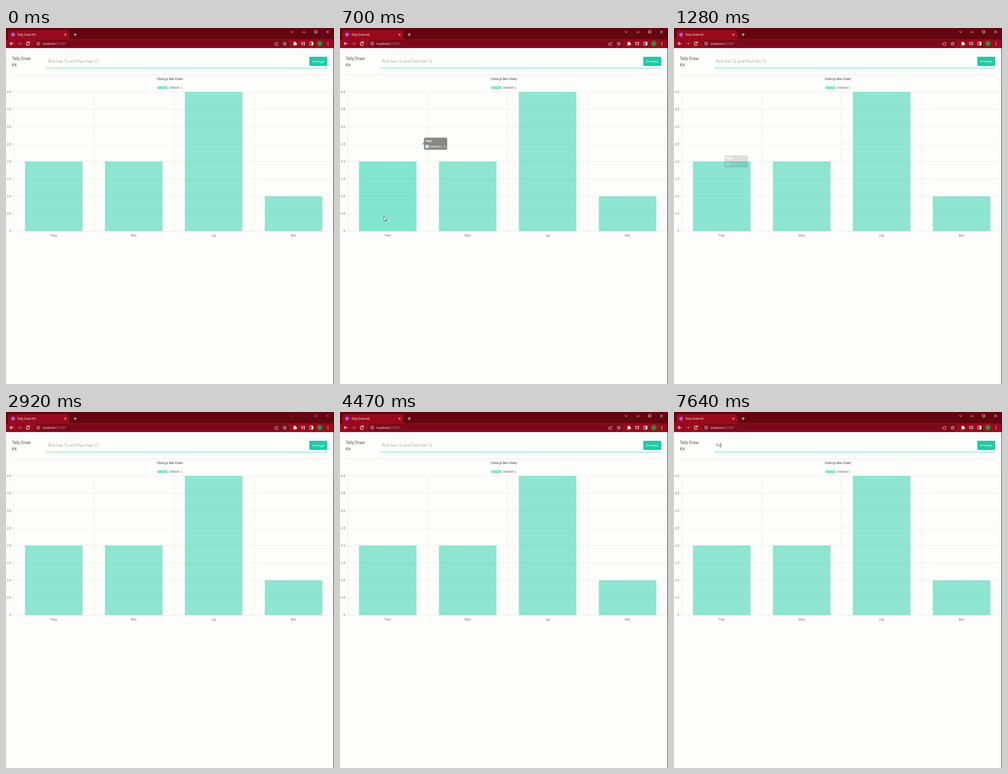
Write an HTML page that moves like this. It is 718 px wide and 780 px high and loops after 8000 ms.

```html
<!DOCTYPE html>
<html lang="en">
<head>
<meta charset="utf-8">
<title>Tally Draw Kit</title>
<style>
  html, body { margin: 0; width: 100%; height: 100%; overflow: hidden; background: #fdfdfb; }
  svg { display: block; width: 718px; height: 780px; }
  text { font-family: "Open Sans", sans-serif; font-size: 8.6px; fill: #333; }
  .chart text { font-family: "Liberation Sans", Arial, sans-serif; font-size: 6.65px; fill: #666; }
  .chart .bold { font-weight: bold; }
  .chart .tip { fill: #fff; }
  .small { font-size: 6.4px; fill: #fff; }
  .icon { fill: none; stroke: #fff; stroke-width: 1; }
  .solid { fill: #fff; }
</style>
</head>
<body>
<svg viewBox="0 0 718 780">
  <rect width="718" height="780" fill="#fdfdfb"/>

  <!-- Browser frame -->
  <rect width="718" height="26" fill="#640511"/>
  <path d="M2 25Q5 25 5 22V9Q5 5 9 5H135Q139 5 139 9V22Q139 25 142 25Z" fill="#990a1c"/>
  <rect y="24.5" width="718" height="19.5" fill="#990a1c"/>
  <rect x="62" y="26" width="558" height="16.5" rx="8.2" fill="#7c0919"/>
  <circle cx="15.5" cy="14.5" r="4.2" fill="#a05cf0"/>
  <text class="small" x="25" y="17">Tally Draw Kit</text>
  <text class="small" style="font-size:6.8px" x="80" y="36.6">localhost<tspan fill="#dba3aa">:5173/?</tspan></text>

  <g class="icon">
    <path d="M128 12.5l4.4 4.4m0-4.4l-4.4 4.4M148 14.5h7m-3.5-3.5v7"/>
    <path d="M16.5 34.2H8.8m3.6-3.6l-3.6 3.6 3.6 3.6" stroke-width="1.2"/>
    <path d="M26 34.2h7.7m-3.6-3.6l3.6 3.6-3.6 3.6" opacity=".45"/>
    <path d="M51 32.2a3.6 3.6 0 1 0 .5 3M51.4 29.8v2.8h-2.8" stroke-width="1.2"/>
    <circle cx="70.5" cy="34.2" r="3.5" stroke-width=".8"/>
    <path d="M70.5 33.6v2.6m0-4.2v.8" stroke-width=".9"/>
    <path d="M590.5 33h-2v5h6.5v-2M590.8 36q.2-3.7 4.7-3.7m-2-2.1l2.4 2.1-2.4 2.1" stroke-width=".8" opacity=".85"/>
    <path d="M610.2 30.3l1.1 2.7 2.9.2-2.2 1.9.7 2.8-2.5-1.5-2.5 1.5.7-2.8-2.2-1.9 2.9-.2Z" stroke-width=".8"/>
    <path d="M646 31.5h6M646 34h5M646 36.5h3M653.2 36.5v-5.2h2" stroke-width="1.1"/>
    <rect x="665.2" y="30.7" width="7" height="7" rx=".6"/>
  </g>
  <g class="solid">
    <path d="M629 31.5h2q-.4-1.8 1.2-1.8t1.2 1.8h2v2.2q1.7-.3 1.7 1.2t-1.7 1.2v2.2h-2.2q0-1.6-1.2-1.6t-1.2 1.6H629v-2.2q1.6 0 1.6-1.2t-1.6-1.2Z"/>
    <circle cx="652.3" cy="36.7" r="1.3"/>
    <rect x="669" y="30.7" width="3.2" height="7"/>
    <circle cx="704.7" cy="31" r=".85"/>
    <circle cx="704.7" cy="34.2" r=".85"/>
    <circle cx="704.7" cy="37.4" r=".85"/>
  </g>
  <circle cx="687" cy="34" r="6.2" fill="#2e7d32"/>
  <text class="small" style="font-size:7.5px" x="687" y="36.7" text-anchor="middle">i</text>
  <g id="controls" class="icon" stroke-width=".9">
    <path d="M624 7.3l2.8 2.8 2.8-2.8M649.3 9h5.8M701.2 5.9l5.4 5.4m0-5.4l-5.4 5.4"/>
    <rect x="675.5" y="6" width="5" height="5" rx=".8"/>
  </g>

  <!-- Prompt form -->
  <text x="13" y="70.3">Tally Draw</text>
  <text x="13" y="83.6">Kit</text>
  <text id="input" x="92" y="76.2"></text>
  <rect id="caret" y="67" width=".8" height="11.5" fill="#333"/>
  <rect x="88" y="87.3" width="615" height="1" fill="#48d3b7"/>
  <rect x="664" y="63" width="39.3" height="20.3" rx="2.2" fill="#20c9a6"/>
  <text x="683.7" y="76" text-anchor="middle" style="font-size:7.6px;fill:#fff">Prompt</text>
  <rect x="13" y="101.7" width="690" height=".8" fill="#e2e2e2"/>

  <g class="chart">
    <text class="bold" x="358.5" y="114.4" text-anchor="middle">Chart.js Bar Chart</text>
    <rect x="331" y="127.6" width="22.5" height="6.6" fill="rgb(32 205 166 / .5)"/>
    <text x="357" y="133.2">Dataset 1</text>
    <g id="plot"></g>
    <g id="tooltip">
      <path d="M3.3 0H47.7Q51 0 51 3.3V23.2Q51 26.5 47.7 26.5H3.3Q0 26.5 0 23.2V16.2L-2.8 13.2 0 10.4V3.3Q0 0 3.3 0Z" fill="rgb(0 0 0 / .8)"/>
      <text class="tip bold" x="3.3" y="9.2">Paul</text>
      <rect x="3.3" y="15.8" width="6.6" height="6.6" fill="#8fe5d1" stroke="#fff" stroke-width=".5"/>
      <text class="tip" x="11.2" y="21.3">Dataset 1: 2</text>
    </g>
  </g>

  <rect x="717" width="1" height="780" fill="#161214"/>
  <path id="cursor" d="M0 0V9.6L2.2 7.6 3.7 11 5.2 10.4 3.7 7.1H6.7Z" fill="#fff" stroke="#222" stroke-width=".7"/>
</svg>

<script>
const LOOP = 8000;
const $ = id => document.getElementById(id);
const clamp = x => Math.max(0, Math.min(1, x));
const lerp = (a, b, p) => a + (b - a) * p;
const easeOutQuart = p => 1 - (1 - clamp(p)) ** 4;

function add(tag, attrs, text = '') {
  const el = document.createElementNS('http://www.w3.org/2000/svg', tag);
  for (const name in attrs) el.setAttribute(name, attrs[name]);
  el.textContent = text;
  $('plot').append(el);
  return el;
}

const chart = { left: 17, right: 717, top: 140, bottom: 445, max: 4 };
const yOf = value => lerp(chart.bottom, chart.top, value / chart.max);
const data = [['Paul', 2], ['Rick', 2], ['Lily', 4], ['Ben', 1]];
const column = (chart.right - chart.left) / data.length;
const barWidth = column * .72;

const gridLine = d => add('path', { d, stroke: 'rgb(0 0 0 / .1)', 'stroke-width': .7 });
for (let value = 0; value <= chart.max; value += .5) {
  const y = yOf(value);
  gridLine(`M${chart.left - 4} ${y}H${chart.right}`);
  add('text', { x: 11.3, y: y + 2.3, 'text-anchor': 'end' }, value ? value.toFixed(1) : '0');
}
for (let i = 0; i <= data.length; i++) {
  gridLine(`M${chart.left + i * column} ${chart.top}V${chart.bottom + 4}`);
}
const bars = data.map(([name, value], i) => {
  const center = chart.left + (i + .5) * column;
  add('text', { x: center, y: 457, 'text-anchor': 'middle' }, name);
  return add('rect', {
    x: center - barWidth / 2, y: yOf(value), width: barWidth,
    height: chart.bottom - yOf(value), fill: 'rgb(32 205 166 / .5)'
  });
});

// Pointer paths as [time, x, y]
const visits = [
  [[300, 2, 484], [560, 41, 443], [700, 96, 413], [840, 110, 406], [1000, 70, 424], [1080, 3, 470]],
  [[3260, 2, 150], [3480, 86, 82]]
];
function pointerAt(t) {
  const path = visits.find(p => t >= p[0][0] && t < p.at(-1)[0]);
  if (!path) return null;
  const next = path.findIndex(point => point[0] > t);
  const [t0, x0, y0] = path[next - 1], [t1, x1, y1] = path[next];
  const p = (t - t0) / (t1 - t0);
  return [lerp(x0, x1, p), lerp(y0, y1, p)];
}

const HOVER_IN = 585, HOVER_OUT = 1110;
const caretSpans = [[3940, 4470], [4990, 5520], [6020, 6590], [7100, LOOP]];

function draw(t) {
  const pointer = pointerAt(t);
  $('cursor').style.display = pointer ? '' : 'none';
  if (pointer) $('cursor').setAttribute('transform', `translate(${pointer})`);

  const move = easeOutQuart((t - HOVER_IN) / 400);
  const hover = move - easeOutQuart((t - HOVER_OUT) / 400);
  bars[0].setAttribute('fill', `rgb(${lerp(32, 0, hover)} 205 ${lerp(166, 160, hover)} / .5)`);
  $('tooltip').setAttribute('transform', `translate(${lerp(397, 111, move)} ${lerp(127, 279, move)})`);
  $('tooltip').setAttribute('opacity', clamp((t - HOVER_IN) / 200) - clamp((t - HOVER_OUT) / 200));

  $('controls').setAttribute('opacity', t >= 1900 && t < 3900 ? .42 : 1);

  const typed = t >= 7640 ? 'Pa' : t >= 7440 ? 'P' : '';
  $('input').textContent = typed || 'Rick has 12 and Paul has 12';
  $('input').style.fill = typed ? '#666' : '#a3a3a3';
  $('caret').setAttribute('x', 92 + (typed ? $('input').getComputedTextLength() : 0));
  $('caret').style.display = caretSpans.some(([on, off]) => t >= on && t < off) ? '' : 'none';
}

const start = performance.now();
function tick() {
  draw((performance.now() - start) % LOOP);
  requestAnimationFrame(tick);
}
tick();
</script>
</body>
</html>
```
